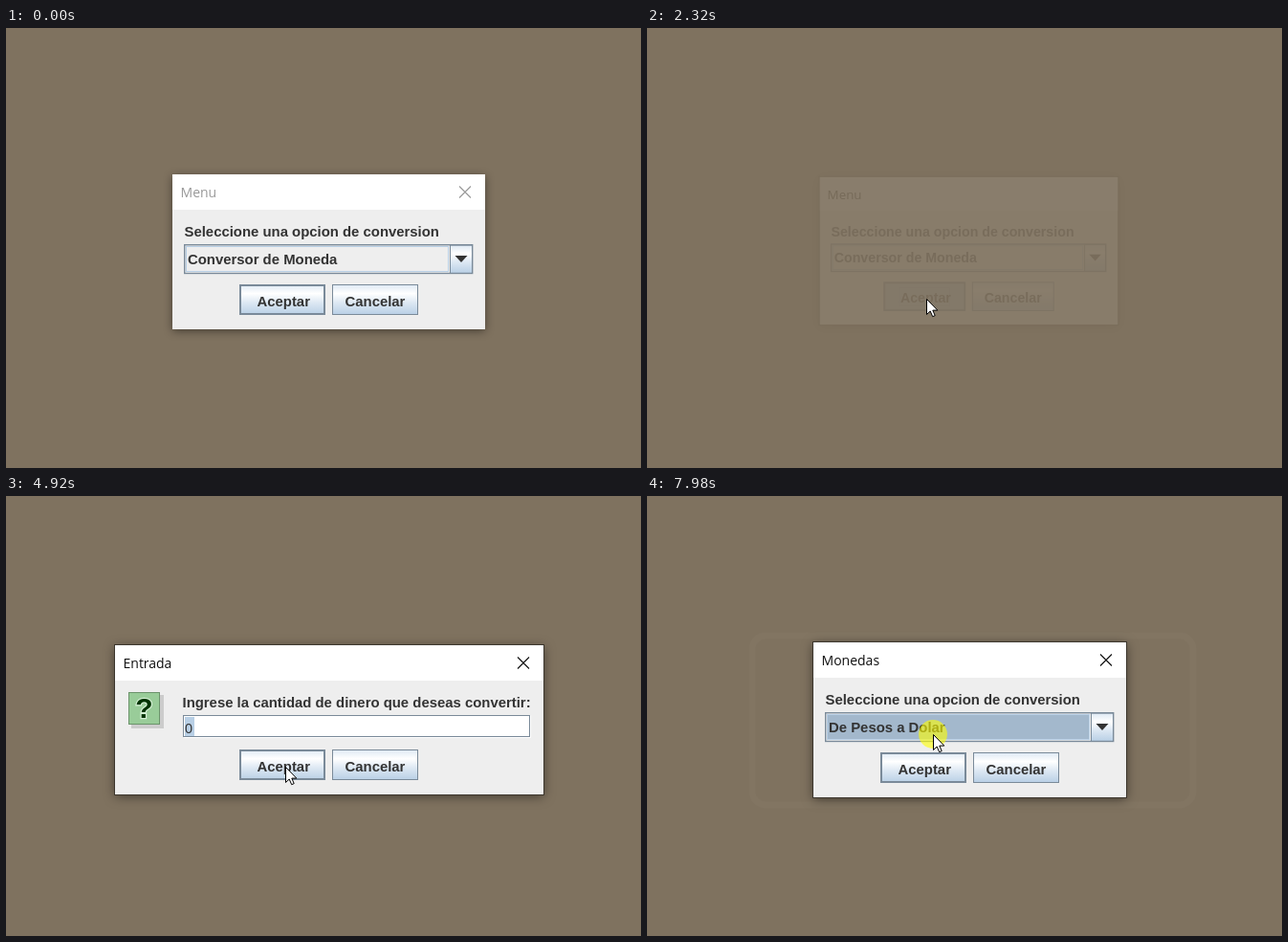
These frames come from a looping animation (664 by 460 pixels, 8 s). An HTML page:

```html
<!DOCTYPE html>
<html lang="es">
<head>
<meta charset="utf-8">
<title>Conversor</title>
<style>
  html, body { margin: 0; width: 100%; height: 100%; overflow: hidden; background: #7f725f; }
  svg { display: block; }
  text { font: bold 14.9px "Liberation Sans", Arial, sans-serif; fill: #333; white-space: pre; }
  .title { font: 14px "Open Sans", "Noto Sans", sans-serif; fill: #111; }
  .close { stroke: #111; stroke-width: 1.1; fill: none; }
  .shell { fill: #eee; filter: drop-shadow(0 2px 6px rgba(0, 0, 0, .5)); }
  .edge { fill: none; stroke: #3d372e; }
  .line { fill: none; stroke: #7a8a99; }
  .shine { fill: none; stroke: #fff; }
  .inactive .title { fill: #999; }
  .inactive .close { stroke: #999; }
  .inactive .edge { display: none; }
  .inactive .shell { filter: drop-shadow(0 2px 5px rgba(0, 0, 0, .45)); }
  .pressed { display: none; }
  .down .pressed { display: inline; }
  .closing .close { display: none; }
  .mark { font-size: 30px; fill: #030; stroke: #d5f0d5; stroke-width: 2.5; paint-order: stroke; text-anchor: middle; }
  .value { font-size: 14.4px; font-weight: normal; }
</style>
</head>
<body>
<svg id="stage" width="664" height="460" viewBox="0 0 664 460">
  <defs>
    <linearGradient id="ocean" x2="0" y2="1">
      <stop offset="0" stop-color="#dde8f3"/>
      <stop offset=".3" stop-color="#fff"/>
      <stop offset=".6" stop-color="#dde8f3"/>
      <stop offset="1" stop-color="#b8cfe5"/>
    </linearGradient>
  </defs>
</svg>
<script>
const stage = document.getElementById('stage');

const rect = (x, y, w, h, attrs) => `<rect x="${x}" y="${y}" width="${w}" height="${h}" ${attrs}/>`;
const label = (x, y, text, attrs = '') => `<text x="${x}" y="${y}" ${attrs}>${text}</text>`;

function button(x, y, text, textX, isDefault) {
  const weight = isDefault ? 2 : 1;
  const pressed = isDefault
    ? `<g class="pressed">${rect(x, y, 90, 32, 'fill="#b8cfe5"')}
       ${rect(261.5, y + 6.5, 55, 20, 'fill="none" stroke="#a3b8cc"')}</g>`
    : '';
  return rect(x, y, 90, 32, 'fill="url(#ocean)"') + pressed
    + rect(x + weight / 2, y + weight / 2, 90 - weight, 32 - weight, `class="line" stroke-width="${weight}"`)
    + label(textX, y + 23, text);
}

const buttons = y => button(244, y, 'Aceptar', 262.5, true) + button(341, y, 'Cancelar', 354.5, false);

function dialog(id, title, x, y, w, h, body) {
  const cx = x + w - 21, cy = y + 18.5;
  return `<g id="${id}">
    ${rect(x, y, w, h, 'class="shell"')}
    ${rect(x, y, w, 37, 'fill="#fff"')}
    ${rect(x - .5, y - .5, w + 1, h + 1, 'class="edge"')}
    ${label(x + 8.5, y + 24, title, 'class="title"')}
    <path class="close" d="M${cx - 6} ${cy - 6}l12 12m0-12l-12 12"/>
    ${body}</g>`;
}

function comboDialog(id, title, choice, selected) {
  return dialog(id, title, 174, 153, 327, 162, `
    ${label(186.5, 218, 'Seleccione una opcion de conversion')}
    ${rect(188.5, 228.5, 274, 26, `fill="${selected ? '#a3b8cc' : '#eee'}" stroke="#b8cfe5"`)}
    ${rect(464.5, 227, 23, 29.5, 'fill="url(#ocean)" stroke="#7a8a99"')}
    ${rect(186.7, 226.7, 301, 29.8, 'class="line" stroke-width="1.4"')}
    <path d="M469.5 238h13l-6.5 7z" fill="#333"/>
    ${label(190, 247, choice)}
    ${buttons(268)}`);
}

const inputDialog = dialog('input', 'Entrada', 114, 156, 448, 156, `
  ${rect(131, 208, 34, 35, 'fill="#ccc"')}
  ${rect(128.5, 205.5, 32, 33, 'fill="#99cc99" stroke="#6b936b"')}
  ${label(144.5, 232, '?', 'class="mark"')}
  ${label(184.5, 221, 'Ingrese la cantidad de dinero que deseas convertir:')}
  ${rect(185.5, 229.5, 362, 22, 'class="line" style="fill:#fff"')}
  <path class="shine" d="M186 252.5h362.5v-23"/>
  ${rect(187, 231, 10, 20, 'id="selection" fill="#b8cfe5"')}
  ${label(187, 247.5, '0', 'class="value" id="value"')}
  ${rect(195, 231, 1, 20, 'id="caret" fill="#222"')}
  ${buttons(265)}`);

stage.insertAdjacentHTML('beforeend', `
  ${rect(110, 146, 461, 177, 'id="halo" rx="14" fill="none" stroke="#fff" stroke-opacity=".02" stroke-width="7"')}
  ${comboDialog('menu', 'Menu', 'Conversor de Moneda', false)}
  ${inputDialog}
  ${comboDialog('coins', 'Monedas', 'De Pesos a Dolar', true)}
  <circle id="click" r="15" fill="#ff0" fill-opacity=".6"/>
  <path id="cursor" d="M.5 .5v16l3.7-3.5 2.5 5.7 2.5-1.1-2.4-5.5h5z" fill="#fff" stroke="#000"/>`);

const LOOP = 8000;
const OPEN = 260, CLOSE = 130, PRESS = 130;
const SHRINK = .046, GHOST = .08;
const MOUSE_STEP = 65, BLINK = 490;
const firstClick = 2060, secondClick = 7980;
const keyTimes = [5520, 5720, 6120];

const windows = [
  { id: 'menu', opens: -OPEN, closes: firstClick + PRESS },
  { id: 'input', opens: 3390, closes: 6785 },
  { id: 'coins', opens: 6810, closes: LOOP }
];

const $ = id => document.getElementById(id);
const show = (id, on) => { $(id).style.display = on ? '' : 'none'; };
const progress = (t, start, length) => Math.min(1, Math.max(0, (t - start) / length));

// A closed window stays as a faint ghost until the next one is fully open.
function drawWindow({ id, opens, closes }, next, t) {
  const opened = 1 - (1 - progress(t, opens, OPEN)) ** 2.4;
  const closed = progress(t, closes, CLOSE);
  const scale = 1 - SHRINK * (1 - opened + closed);
  const drift = closed ? 22 : 0;
  const cx = 337.5 - drift, cy = 234 - drift;
  const node = $(id);
  show(id, t >= opens && !(next && t >= next.opens + OPEN));
  node.style.opacity = opened * (1 - (1 - GHOST) * closed);
  node.setAttribute('transform', `translate(${cx} ${cy}) scale(${scale}) translate(${-cx} ${-cy})`);
  node.classList.toggle('down', t >= closes - PRESS && closes < LOOP);
  node.classList.toggle('closing', closed > 0);
}

function drawField(t) {
  const typed = keyTimes.filter(time => t >= time).length;
  $('value').textContent = '100'.slice(0, typed) || '0';
  $('caret').setAttribute('x', 187 + 8 * Math.max(1, typed));
  show('caret', typed || Math.floor((t - 3430) / BLINK) % 2 === 0);
  show('selection', !typed);
}

function cursorAt(t) {
  const leg = (start, length) => progress(Math.floor((t - start) / MOUSE_STEP) * MOUSE_STEP, 0, length);
  const u = 1 - (1 - leg(500, 820)) ** 1.5, v = 1 - u;
  const lift = leg(7585, 195);
  const curve = (a, b, c) => v * v * a + 2 * u * v * b + u * u * c;
  return [curve(533, 385, 292) + 7 * lift, curve(456, 460, 283) - 34 * lift].map(Math.round);
}

function draw(t) {
  windows.forEach((win, i) => drawWindow(win, windows[i + 1], t));
  $('menu').classList.toggle('inactive', t < firstClick);
  show('halo', t >= windows[1].closes + CLOSE / 2);
  drawField(t);

  const place = `translate(${cursorAt(t).join(' ')})`;
  for (const id of ['cursor', 'click']) $(id).setAttribute('transform', place);
  show('cursor', t >= 500);
  show('click', [firstClick, secondClick].some(time => t >= time && t < time + PRESS));
}

const start = performance.now();
function tick() {
  draw((performance.now() - start) % LOOP);
  requestAnimationFrame(tick);
}
tick();
</script>
</body>
</html>
```
